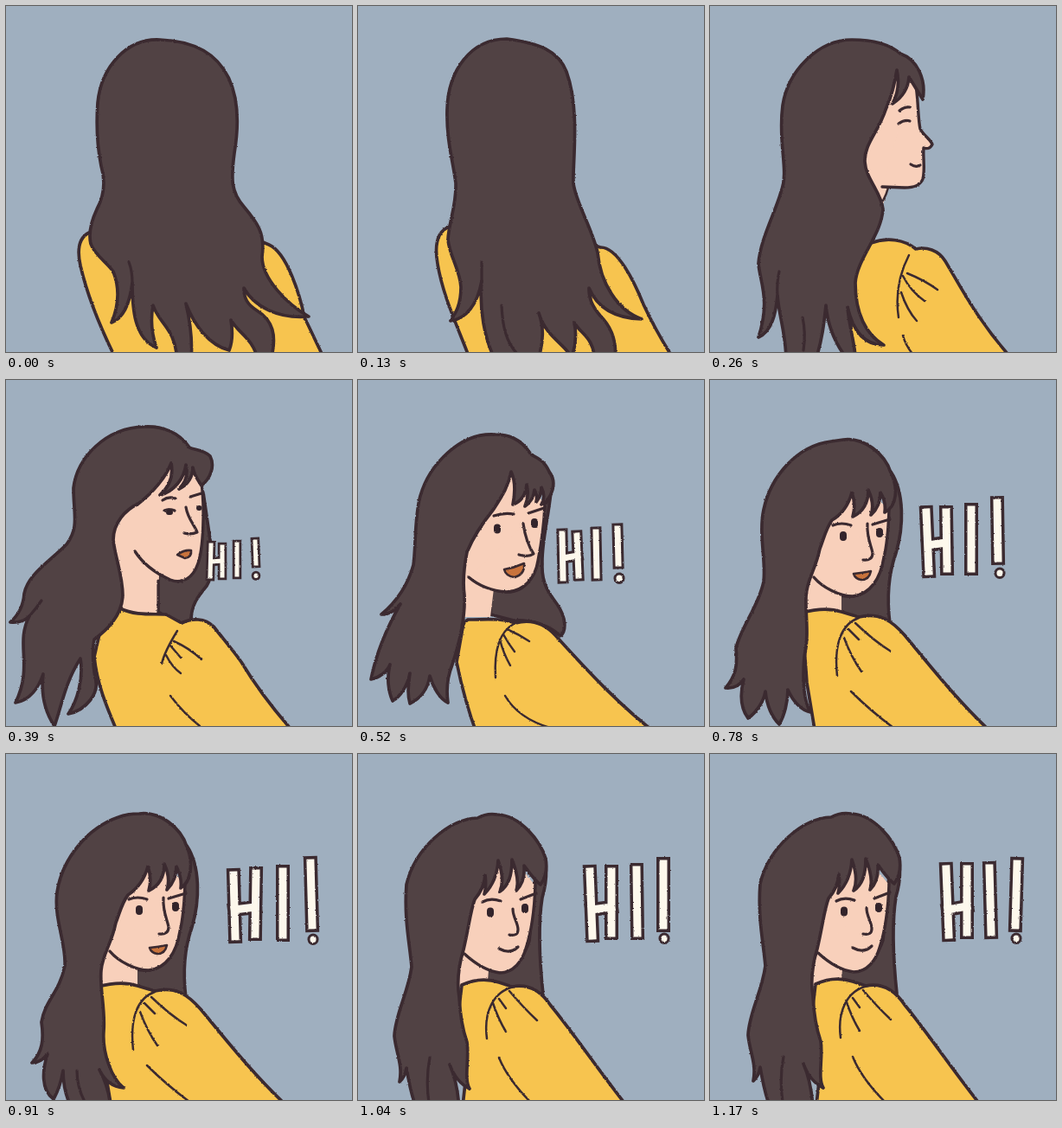
An HTML page without scripts that plays this animation: 400x400 px, repeating every 1.3 s.

```html
<!DOCTYPE html>
<html lang="en">
<head>
<meta charset="utf-8">
<title>Hi!</title>
<style>
html, body { margin: 0; width: 100%; height: 100%; overflow: hidden; background: #9fafbf; }
svg { display: block; width: 100%; height: 100%; }
path { stroke-linecap: round; stroke-linejoin: round; }
.hair, .body, .skin, .line, .thin, .lips { stroke: #3b2a30; stroke-width: 3.7; }
.hair { fill: #514244; }
.body { fill: #f7c44f; }
.skin, .flat { fill: #f8d0bb; }
.skin { stroke-width: 3.4; }
.line, .thin, .eyes { fill: none; }
.line { stroke-width: 3.2; }
.thin { stroke-width: 2.5; }
.eyes { stroke: #33242b; stroke-width: 8; }
.lips { fill: #c9733c; stroke-width: 2.6; }
.type path { stroke-linecap: square; }
.type .dot { stroke-linecap: round; }
.rim, .ink { fill: none; }
.rim { stroke: #3b2a30; stroke-width: 16; }
.ink { stroke: #fdf8ec; stroke-width: 9; }
.small .rim { stroke-width: 10.5; }
.small .ink { stroke-width: 5; }
.mid .rim { stroke-width: 13; }
.mid .ink { stroke-width: 7; }
.pose { visibility: hidden; animation: show 1.3s step-end calc(var(--n) * .13s) infinite; }
@keyframes show { 0% { visibility: visible; } 10%, 100% { visibility: hidden; } }
</style>
</head>
<body>
<svg viewBox="0 0 400 400">
<defs>
  <filter id="crayon" filterUnits="userSpaceOnUse" x="-10" y="-10" width="420" height="420" color-interpolation-filters="sRGB">
    <feTurbulence type="fractalNoise" baseFrequency=".5" numOctaves="2" seed="4"/>
    <feDisplacementMap in="SourceGraphic" scale="2.2" xChannelSelector="R" yChannelSelector="G"/>
  </filter>

  <!-- lettering -->
  <g class="type">
    <path id="hiA" d="M237 191L236 227M250 193L250 226M237 210L250 209M267 190L267 225M288 187L289 212"/>
    <path id="hiB" d="M236 178L237 229M253 180L255 226M237 206L254 203M275 176L276 226M300 172L301 212"/>
    <path id="hiC" d="M236 168L240 230M256 167L260 226M238 203L258 199M283 163L284 226M311 158L312 211"/>
    <path id="hiD" d="M250 153L253 221M273 153L274 218M252 191L273 188M302 150L302 218M332 142L333 206"/>
    <path id="hiE" d="M263 140L265 211M289 138L288 208M264 180L288 177M320 136L320 209M352 126L354 198"/>
    <path id="hiF" d="M268 136L271 210M293 136L293 207M270 180L293 177M322 134L323 207M353 127L353 198"/>
    <path id="hiG" d="M273 133L276 209M297 133L297 206M275 180L297 176M323 132L325 206M355 127L353 198"/>
    <path id="dot" class="dot" d="M0 0v.5"/>
  </g>

  <!-- lively look -->
  <g id="bodyB">
    <path class="body" d="M117 276C140 276 155 274 172 280C190 275 205 280 218 294C255 335 295 378 338 410H128C115 375 108 345 104 325L112 280Z"/>
    <path class="thin" d="M170 281C154 290 147 310 149 343M162 287Q176 293 188 301M158 293Q164 304 171 313M154 299Q158 315 166 329M160 364Q175 390 212 401"/>
  </g>
  <g id="backB">
    <path class="hair" d="M145 246C170 255 190 250 200 215L208 150L215 135C211 170 204 195 205 218C204 240 213 252 222 264C233 280 233 295 226 301C215 290 195 282 172 283L145 276Z"/>
    <path class="flat" d="M170 100L209 150L149 246L145 279H115L105 200Z"/>
  </g>
  <g id="headB">
    <path class="skin" d="M121 234C135 246 150 250 165 251C185 250 198 235 201 215C205 195 208 175 209 150"/>
    <path class="hair" d="M152 69C110 66 75 105 65 140C58 165 60 200 57 220C50 245 38 262 20 277C30 277 36 272 42 265C26 293 14 322 8 352C18 350 27 343 30 335C26 350 28 366 33 377C42 372 50 360 53 345C51 360 50 370 53 380C66 374 74 362 76 348C80 362 88 375 97 379C95 365 96 350 102 335C112 305 117 280 116 255C114 240 115 225 119 205C127 185 142 165 150 155C161 138 167 128 170 112C176 125 174 140 172 150C183 146 187 138 188 127C191 138 188 147 186 152C193 147 196 142 197 133C200 138 200 143 199 147C203 142 205 136 205 130C209 138 208 145 205 150C217 143 224 125 214 112C208 98 198 95 193 92C180 72 165 69 152 69Z"/>
    <path class="line" d="M150 163Q162 159 173 161M190 160L208 154M184 172C186 186 190 198 196 207Q190 211 179 208"/>
    <path class="eyes" d="M154 176.500v3M197 170v3"/>
    <path class="lips" d="M162 225Q174 223 185 218Q186 231 174 234Q164 233 162 225Z"/>
  </g>

  <!-- settled look -->
  <g id="torsoC">
    <path class="hair" d="M148 248C170 255 190 245 198 215L206 150L209 106C225 130 224 170 215 200C206 225 204 250 208 282H172L147 270Z"/>
    <path class="flat" d="M160 100L206 150L152 248L152 272H106L110 190Z"/>
    <path class="body" d="M106 269C125 264 140 264 152 268L172 274C195 268 210 278 225 295C250 325 285 370 328 410H122L112 350Z"/>
    <path class="thin" d="M172 275C152 282 143 305 147 342M168 281Q190 302 208 313M160 288L172 300M155 298Q163 320 175 337M163 360Q185 382 212 402"/>
    <path class="skin" d="M120 228C130 240 150 250 165 250C185 248 197 230 201 205C205 190 206 175 207 150"/>
  </g>
  <g id="faceC">
    <path class="line" d="M142 168Q152 164 163 168M188 167L208 161M182 166C181 182 186 190 188 200Q188 209 177 208"/>
    <path class="eyes" d="M154 179v3M196 175v3"/>
    <path class="lips" d="M166 224Q176 223 186 221Q184 231 175 231Q168 230 166 224Z"/>
  </g>

  <!-- smile -->
  <g id="girlD">
    <path class="hair" d="M150 248C170 255 190 245 200 215L206 150L212 106C222 120 221 145 215 165C211 190 211 230 216 277L180 270L152 262Z"/>
    <path class="flat" d="M165 100L206 150L153 248L152 264L118 268L112 190Z"/>
    <path class="body" d="M122 266C135 260 150 258 165 263L180 268C200 264 215 275 225 290C250 320 280 365 316 410H122C128 380 128 340 118 300Z"/>
    <path class="thin" d="M183 268C158 273 147 298 151 328M177 273Q193 292 209 307M165 282L173 293M158 287Q164 305 173 320M165 350Q175 375 203 403"/>
    <path class="skin" d="M125 230C138 242 152 250 166 252C182 252 192 238 196 224C203 203 206 180 207 150"/>
    <path class="hair" d="M140 73C108 74 68 107 58 150C55 190 62 220 64 245C60 275 45 300 44 325C46 345 54 358 50 378C55 374 57 368 58 362C61 380 64 395 70 410H119C118 390 114 372 108 358C113 372 121 381 131 386C124 375 131 350 128 332C122 315 120 300 119 280C116 262 118 245 124 225C130 200 132 180 137 167C143 160 148 152 149 139C150 148 150 155 148 161C157 152 163 140 164 122C169 136 170 149 166 158C176 151 180 140 180 121C186 136 188 148 185 157C192 150 195 140 194 128C200 136 206 145 213 150C219 142 221 132 219 120C213 100 190 70 163 69Q151 67 140 73Z"/>
    <path class="line" d="M85 350Q80 375 84 402"/>
    <path class="line" d="M146 170Q155 165 167 169M190 167L208 160M181 178C181 188 187 194 187 202Q187 210 177 208M165 224Q178 231 187 222"/>
    <path class="eyes" d="M155 180.500v3M195 176v3"/>
  </g>
</defs>

<g filter="url(#crayon)">
  <g class="pose" style="--n:0">
    <path class="body" d="M96 262C84 268 82 282 86 300C94 335 108 370 128 410H369C358 388 352 374 345 360C340 335 325 285 304 276L290 270Z"/>
    <path class="hair" d="M178 39C140 37 110 70 106 112C104 140 106 165 110 185C116 205 112 222 105 235C98 250 95 262 98 275C102 287 116 296 124 307C131 325 131 345 122 366C138 360 144 337 146 320C146 350 148 384 174 395C168 378 167 362 170 346C177 368 196 372 198 410H214C216 385 213 365 208 344C218 370 235 392 258 398C262 388 262 375 260 363C270 380 284 382 292 410H306C314 380 308 363 290 352C279 345 275 338 275 326C287 348 315 362 350 359C325 345 296 315 296 290C300 262 290 250 275 232C260 215 260 200 264 170C274 110 265 42 178 39Z"/>
    <path class="line" d="M142 296Q146 306 146 320"/>
  </g>

  <g class="pose" style="--n:1">
    <path class="body" d="M106 255C92 260 88 275 92 298C98 335 115 370 130 410H366C352 388 337 360 330 345C320 320 300 278 280 279L200 250Z"/>
    <path class="hair" d="M172 38C130 38 104 75 103 120C102 155 110 180 113 205C114 230 105 250 104 270C106 290 118 305 119 325C119 345 113 355 107 364C125 362 138 345 143 318C140 350 146 385 159 410H208C216 385 214 368 209 355C217 382 238 390 247 406C253 390 252 376 250 366C258 380 272 382 274 410H297C300 385 290 368 280 358C270 346 267 338 267 326C277 350 298 361 328 362C300 352 280 320 277 285C270 255 252 228 249 205C248 180 257 120 241 76C232 52 210 43 172 38Z"/>
    <path class="line" d="M143 296V318M166 346C167 370 171 388 184 402"/>
  </g>

  <g class="pose" style="--n:2">
    <path class="flat" d="M216 65L236 80L205 212L200 230H180L175 195L188 130Z"/>
    <path class="thin" d="M206 210Q204 218 200 225"/>
    <path class="body" d="M186 274C205 267 225 270 238 281C250 278 264 282 272 295C290 325 310 365 351 410H160C165 370 162 330 170 300Z"/>
    <path class="thin" d="M230 288C216 315 215 340 218 360M228 309Q248 317 263 328M223 312Q232 330 248 341M221 331Q228 352 239 364M223 381Q226 392 234 402"/>
    <path class="skin" d="M236 80C241 100 240 130 243 142C247 150 255 154 257 160C254 166 250 165 247 164C246 175 249 190 246 200C243 208 235 210 225 210L199 209"/>
    <path class="hair" d="M164 39C125 39 90 75 84 115C78 160 92 190 82 215C75 240 58 270 56 298C58 320 70 340 56 383C72 376 76 355 78 335C80 360 88 380 88 410H122C130 385 132 365 134 346C136 370 144 390 160 410L168 404C166 385 160 365 159 348C165 375 178 392 201 392C180 380 168 355 168 320C170 292 198 265 200 235C198 215 180 200 179 180C178 160 195 145 203 120C211 102 213 90 216 74C219 88 218 100 211 113C222 106 229 97 230 82C236 92 241 100 246 108C250 85 240 62 220 55C205 42 185 39 164 39Z"/>
    <path class="line" d="M80 307Q77 320 78 335M107 360Q111 378 108 398"/>
    <path class="line" d="M219 121Q225 116 231 117M218 136Q225 131 231 133M232 183Q238 187 243 184"/>
  </g>

  <g class="pose" style="--n:3">
    <path class="hair" d="M176 215V268L200 282L214 278C214 260 222 250 232 238C240 225 240 200 236 185L228 130Z"/>
    <path class="flat" d="M195 85L226 118L177 226L175 273H132L118 190L150 130Z"/>
    <path class="line" d="M176 232V270"/>
    <path class="body" d="M132 264C150 273 170 270 185 271L203 281C215 275 230 275 240 285C250 298 262 312 272 326C290 356 310 382 335 410H130C115 375 105 350 102 320L110 285Z"/>
    <path class="thin" d="M198 290C190 303 183 315 180 328M194 302Q212 310 226 323M190 307L202 321M185 318Q192 332 202 339M190 365Q205 385 224 400"/>
    <path class="skin" d="M149 198C158 212 172 223 190 231C203 236 216 230 222 212C228 195 230 150 226 118"/>
    <path class="hair" d="M160 54C115 55 82 90 78 125C78 155 85 170 70 190C50 210 25 225 21 247C20 262 14 272 5 280C15 281 22 278 27 273C10 305 32 330 11 373C28 370 38 355 43 340C40 365 46 385 56 400C64 378 68 350 86 322C90 345 82 372 72 386C92 382 109 362 103 344C100 325 100 310 102 300C115 290 133 275 135 250C135 225 126 205 124 185C124 165 138 150 153 143C170 130 185 112 191 96C194 112 188 124 178 133C194 129 206 114 208 98C211 110 207 119 200 126C211 121 216 111 216 101C218 112 223 117 226 122C236 114 242 100 236 88C228 80 217 81 212 78C200 60 180 53 160 54Z"/>
    <path class="line" d="M41 255Q35 264 27 273"/>
    <path class="line" d="M181 139Q188 134 196 137M213 135L226 131M183 151Q189 148 195 151M208 147C210 160 218 168 221 176Q214 179 206 177"/>
    <path class="eyes" d="M188 153h2M223 148h.5" style="stroke-width:6"/>
    <path class="lips" d="M198 202Q206 196 214 197Q215 205 207 206Z"/>
    <g class="small">
      <use href="#hiA" class="rim"/><use href="#hiA" class="ink"/>
      <g transform="translate(289 226)"><use href="#dot" class="rim"/><use href="#dot" class="ink"/></g>
    </g>
  </g>

  <g class="pose" style="--n:4">
    <use href="#backB" x="8" y="-5"/>
    <use href="#bodyB" x="10" y="1"/>
    <use href="#headB" x="7" y="-6"/>
    <g class="mid">
      <use href="#hiB" class="rim"/><use href="#hiB" class="ink"/>
      <g transform="translate(302 229)"><use href="#dot" class="rim"/><use href="#dot" class="ink"/></g>
    </g>
  </g>

  <g class="pose" style="--n:5">
    <use href="#backB"/>
    <use href="#bodyB"/>
    <use href="#headB"/>
    <use href="#hiC" class="rim"/><use href="#hiC" class="ink"/>
    <g class="mid" transform="translate(315 231)"><use href="#dot" class="rim"/><use href="#dot" class="ink"/></g>
  </g>

  <g class="pose" style="--n:6">
    <use href="#torsoC"/>
    <path class="hair" d="M140 71C100 76 70 112 62 150C56 178 65 210 62 233C56 262 36 285 30 310C32 330 30 342 18 356C28 357 35 352 39 346C34 365 36 380 44 391C54 384 62 372 64 360C66 378 72 390 80 398C86 388 90 372 90 358C96 372 106 382 116 384C108 370 107 345 109 320C115 295 110 270 111 250C112 230 122 220 127 195C132 182 134 172 141 162C153 155 160 145 164 130C168 141 167 151 165 158C178 152 183 140 183 127C188 138 189 148 186 156C194 149 197 140 197 130C202 138 203 146 202 153C216 146 218 125 209 107C202 85 178 66 154 69Z"/>
    <use href="#faceC"/>
    <use href="#hiD" class="rim"/><use href="#hiD" class="ink"/>
    <g class="mid" transform="translate(335 223)"><use href="#dot" class="rim"/><use href="#dot" class="ink"/></g>
  </g>

  <g class="pose" style="--n:7">
    <use href="#torsoC"/>
    <path class="hair" d="M130 73C95 85 65 120 59 160C55 190 70 220 68 245C62 275 45 285 41 310C44 330 42 345 30 357C38 357 44 352 48 347C42 365 40 388 55 399C60 390 64 378 66 366C66 385 70 398 76 410H121C120 395 116 380 108 365C114 378 124 385 136 386C122 375 111 345 113 320C115 295 108 270 110 250C112 230 122 220 127 195C132 182 134 172 141 163C153 155 160 145 164 130C168 141 167 151 165 158C178 152 183 140 183 127C188 138 189 148 186 157C194 149 197 140 197 130C202 140 203 148 202 155C214 148 217 125 209 107C202 85 178 66 154 69Q140 69 130 73Z"/>
    <path class="line" d="M82 366Q82 385 91 402"/>
    <use href="#faceC"/>
    <use href="#hiE" class="rim"/><use href="#hiE" class="ink"/>
    <g class="mid" transform="translate(355 214)"><use href="#dot" class="rim"/><use href="#dot" class="ink"/></g>
  </g>

  <g class="pose" style="--n:8">
    <use href="#girlD" x="-2" y="1"/>
    <use href="#hiF" class="rim"/><use href="#hiF" class="ink"/>
    <g class="mid" transform="translate(354 213)"><use href="#dot" class="rim"/><use href="#dot" class="ink"/></g>
  </g>

  <g class="pose" style="--n:9">
    <use href="#girlD"/>
    <use href="#hiG" class="rim"/><use href="#hiG" class="ink"/>
    <g class="mid" transform="translate(354 213)"><use href="#dot" class="rim"/><use href="#dot" class="ink"/></g>
  </g>
</g>
</svg>
</body>
</html>
```
